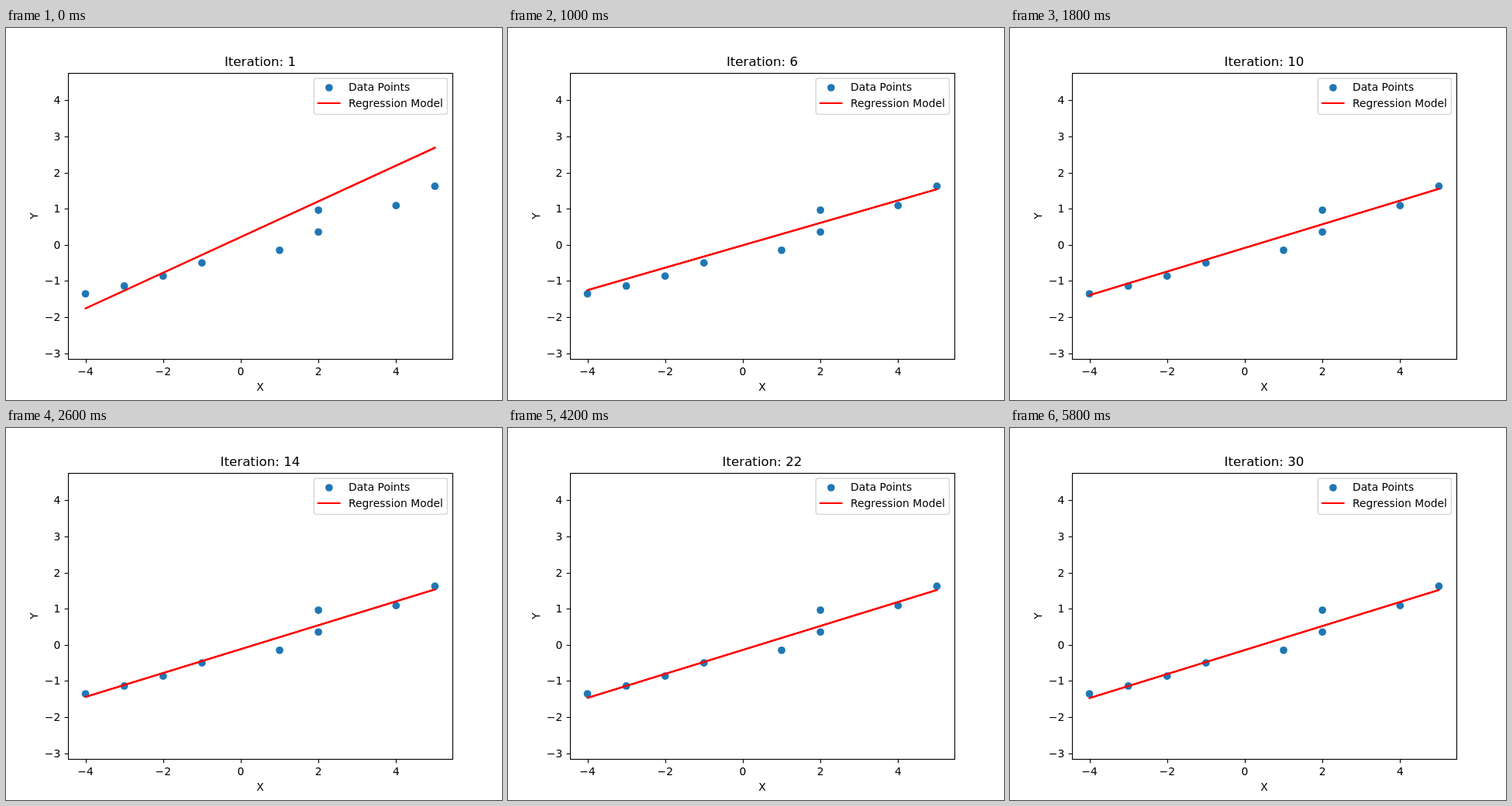
An HTML page with a canvas that plays this animation: 640 px wide and 480 px high, repeating every 6000 ms.

```html
<!DOCTYPE html>
<html lang="en">
<head>
<meta charset="utf-8">
<title>Linear regression by gradient descent</title>
<style>
  html, body { margin: 0; height: 100%; overflow: hidden; background: #fff; }
  canvas { display: block; }
</style>
</head>
<body>
<canvas id="plot" width="640" height="480"></canvas>
<script>
const ctx = document.getElementById('plot').getContext('2d');
const STEP_MS = 200, STEPS = 30, RATE = 0.02;
const BLUE = '#1f77b4', RED = '#f00';
const points = [
  [-4, -1.355], [-3, -1.14], [-2, -0.865], [-1, -0.5], [1, -0.15],
  [2, 0.96], [2, 0.355], [4, 1.085], [5, 1.62]
];
const px = x => 302.95 + 50.1 * x;
const py = y => 279.8 - 46.65 * y;

// Gradient descent on the squared error, one model per iteration
const models = [{ m: 0.494, b: 0.217 }];
while (models.length < STEPS) {
  const { m, b } = models[models.length - 1];
  let dm = 0, db = 0;
  for (const [x, y] of points) {
    const error = m * x + b - y;
    dm += error * x;
    db += error;
  }
  models.push({ m: m - RATE * dm, b: b - RATE * db });
}

function text(str, x, y, align = 'center', size = 13.89) {
  ctx.font = size + 'px "DejaVu Sans", sans-serif';
  ctx.textAlign = align;
  ctx.fillStyle = '#000';
  ctx.fillText(str, x, y);
}

function line(x1, y1, x2, y2, color, width, cap = 'butt') {
  ctx.strokeStyle = color;
  ctx.lineWidth = width;
  ctx.lineCap = cap;
  ctx.beginPath();
  ctx.moveTo(x1, y1);
  ctx.lineTo(x2, y2);
  ctx.stroke();
}

function dot(x, y) {
  ctx.fillStyle = BLUE;
  ctx.beginPath();
  ctx.arc(x, y, 4.86, 0, 2 * Math.PI);
  ctx.fill();
}

const label = v => String(v).replace('-', '\u2212');

function drawAxes() {
  for (let v = -4; v <= 4; v += 2) {
    const x = Math.round(px(v)) + 0.5;
    line(x, 427.5, x, 432.4, '#000', 1.11);
    text(label(v), px(v), 448);
  }
  for (let v = -3; v <= 4; v++) {
    const y = Math.round(py(v));
    line(75.6, y + 0.5, 80.5, y + 0.5, '#000', 1.11);
    text(label(v), 70.3, y + 5, 'right');
  }
  ctx.strokeStyle = '#000';
  ctx.lineWidth = 1.11;
  ctx.strokeRect(80.5, 58.5, 496, 369);

  text('X', 328, 468);
  ctx.save();
  ctx.translate(41, 242.4);
  ctx.rotate(-Math.PI / 2);
  text('Y', 0, 0);
  ctx.restore();
}

function drawLegend() {
  ctx.beginPath();
  ctx.roundRect(397.3, 65, 172.2, 46.4, 2.78);
  ctx.fillStyle = 'rgba(255,255,255,.8)';
  ctx.fill();
  ctx.strokeStyle = 'rgba(204,204,204,.8)';
  ctx.lineWidth = 1.39;
  ctx.stroke();
  dot(416.9, 77);
  text('Data Points', 442, 81, 'left');
  line(402.8, 97, 430.6, 97, RED, 2.08, 'square');
  text('Regression Model', 442, 102, 'left');
}

function draw(now) {
  const step = Math.floor(now / STEP_MS) % STEPS;
  const { m, b } = models[step];
  ctx.fillStyle = '#fff';
  ctx.fillRect(0, 0, 640, 480);

  for (const [x, y] of points) dot(px(x), py(y));
  // The model is traced back and forth, which hardens its edges
  for (let pass = 0; pass < 3; pass++) {
    line(px(-4), py(b - 4 * m), px(5), py(b + 5 * m), RED, 2.08, 'round');
  }
  drawAxes();
  drawLegend();
  text('Iteration: ' + (step + 1), 328, 49, 'center', 16.67);
}

const start = performance.now();
function tick() {
  draw(performance.now() - start);
  requestAnimationFrame(tick);
}
tick();
</script>
</body>
</html>
```
